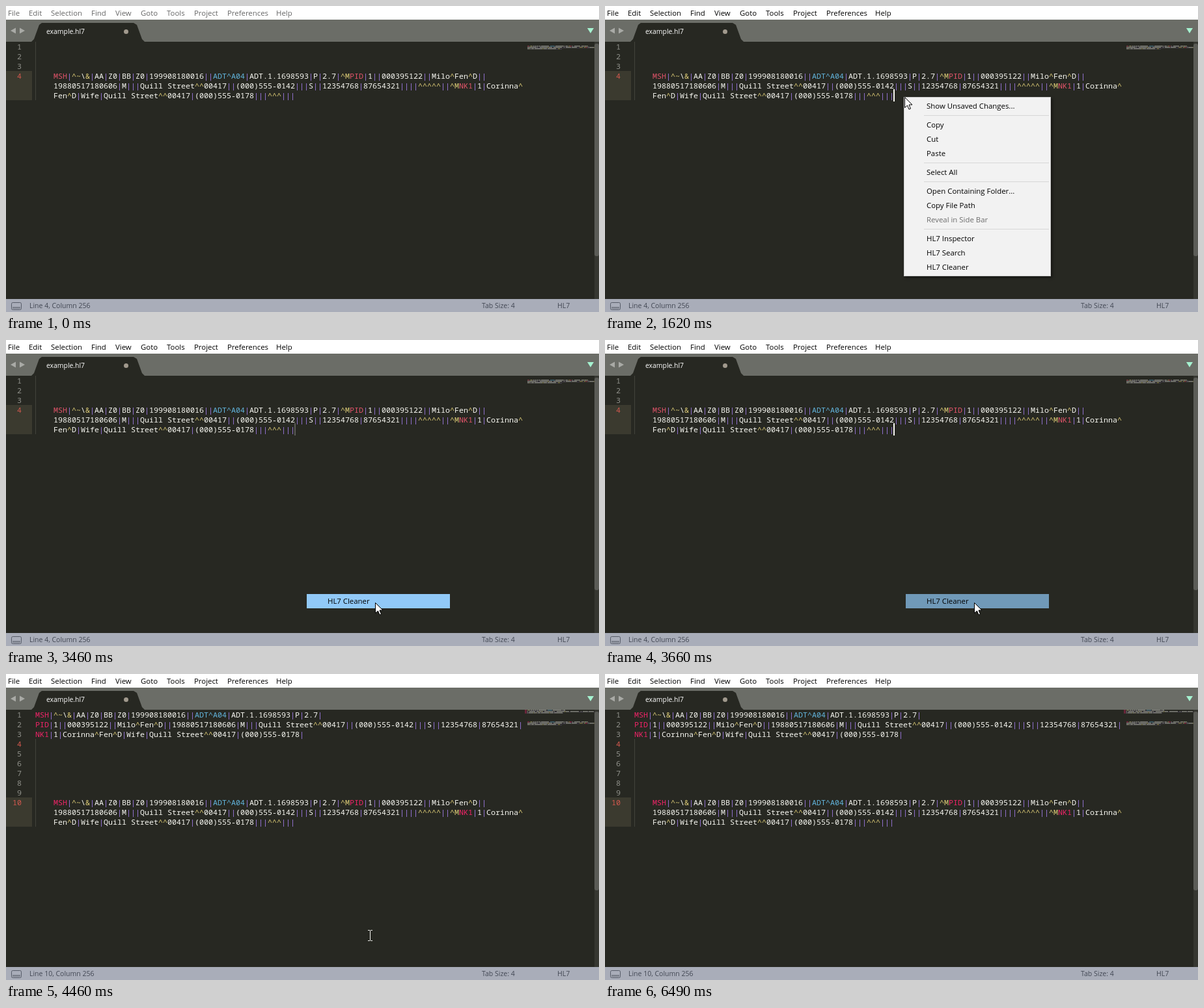
An HTML page with a canvas that plays this animation: 911 by 471 pixels, repeating every 6.69 s.

```html
<!DOCTYPE html>
<html lang="en">
<head>
<meta charset="utf-8">
<title>HL7 Cleaner</title>
<style>
html, body { margin: 0; height: 100%; overflow: hidden; background: #272822; }
canvas { display: block; }
</style>
</head>
<body>
<canvas id="stage" width="911" height="471"></canvas>
<script>
const ctx = document.getElementById('stage').getContext('2d');
const LOOP = 6690, STEPS = 33, CHAR = 7, ROW = 15;
const MONO = '11.667px "Noto Sans Mono", monospace';
const ui = size => `${size}px "Open Sans", sans-serif`;

const header = 'MSH|^~\\&|AA|Z0|BB|Z0|199908180016||ADT^A04|ADT.1.1698593|P|2.7|';
const patient = 'PID|1||000395122||Milo^Fen^D||';
const details = '19880517180606|M|||Quill Street^^00417||(000)555-0142|||S||12354768|87654321|';
const raw = [
  header + '^M' + patient,
  details + '|||^^^^^||^MNK1|1|Corinna^',
  'Fen^D|Wife|Quill Street^^00417|(000)555-0178|||^^^|||'
];
const cleaned = [header, patient + details, 'NK1|1|Corinna^Fen^D|Wife|Quill Street^^00417|(000)555-0178|'];

const menuBar = [['File', 3], ['Edit', 35], ['Selection', 69], ['Find', 131], ['View', 168], ['Goto', 207],
  ['Tools', 247], ['Project', 289], ['Preferences', 340], ['Help', 415]];
const contextMenu = [['Show Unsaved Changes...', 154], ['Copy', 183], ['Cut', 205], ['Paste', 227],
  ['Select All', 256], ['Open Containing Folder...', 285], ['Copy File Path', 307],
  ['Reveal in Side Bar', 329], ['HL7 Inspector', 358], ['HL7 Search', 380], ['HL7 Cleaner', 402]];

// Mouse stops: step, x, y
const mouseStops = [[1, 637, 409], [6, 461, 141], [8, 460, 140], [12, 562, 370], [15, 567, 403],
  [18, 567, 404], [19, 559, 402], [23, 559, 402], [24, 557, 400], [25, 557, 400], [31, 688, 474]];

function rect(color, x, y, w, h) {
  ctx.fillStyle = color;
  ctx.fillRect(x, y, w, h);
}

function text(str, x, y, color, font, align = 'left') {
  ctx.font = font;
  ctx.fillStyle = color;
  ctx.textAlign = align;
  ctx.fillText(str, x, y);
}

function polygon(color, points, stroke) {
  ctx.beginPath();
  points.forEach(([x, y]) => ctx.lineTo(x, y));
  ctx.closePath();
  ctx.fillStyle = color;
  ctx.fill();
  if (stroke) {
    ctx.strokeStyle = stroke;
    ctx.lineWidth = 1;
    ctx.stroke();
  }
}

function tokenColor(token, red) {
  if (/^(MSH|PID|NK1)$/.test(token)) return red;
  if (token === 'ADT^A04') return '#62b4dc';
  if (token === '|') return '#a07be8';
  return /^[\^~&]/.test(token) ? '#e0cf78' : '#f8f8f2';
}

function codeLine(str, x, row, red) {
  const mapX = 797 + (x - 45) / CHAR, mapY = 55 + row.map * 2;
  let i = 0;
  for (const token of str.match(/MSH|PID|NK1|ADT\^A04|\^M|[|^~&]|[^|^~&]+/g)) {
    const color = tokenColor(token, red);
    text(token, x + i * CHAR, row.y + 4, color, MONO);
    ctx.globalAlpha = 0.42;
    if (token !== '|') rect(color, mapX + i, mapY, token.length, 1);
    ctx.globalAlpha = 0.22;
    rect(color, mapX + i, mapY + 1, token.length, 1);
    ctx.globalAlpha = 1;
    i += token.length;
  }
}

const rowAt = n => ({ y: 63 + n * ROW, map: n });

function drawEditor(done, caret) {
  const last = done ? 10 : 4;
  const red = done ? '#f02468' : '#e2546a';
  const top = 55 + (last - 1) * ROW;
  rect('#272822', 0, 55, 911, 396);
  rect('#3b3a2f', 0, top, 40, 45);
  const guideTop = done ? 100 : 55;
  rect('#42433b', 45, guideTop, 1, top + 45 - guideTop);
  for (let n = 1; n <= last; n++) {
    const active = n === 4 || n === last;
    text(n, 24, 52 + n * ROW, active ? '#d2584e' : '#90918b', MONO, 'right');
  }
  if (done) cleaned.forEach((line, i) => codeLine(line, 45, rowAt(i), red));
  raw.forEach((line, i) => codeLine(line, 73, rowAt(last - 1 + i), red));
  rect(`rgba(248,248,242,${caret})`, 443, top + 28, 2, 19);
  rect('#363731', 904, 55, 7, 396);
  ctx.fillStyle = '#5b5c57';
  ctx.beginPath();
  ctx.roundRect(904, 58, 7, done ? 275 : 327, 3);
  ctx.fill();
}

function drawChrome(focused, line) {
  rect('#fff', 0, 0, 911, 21);
  menuBar.forEach(([label, x]) => text(label, x, 15, focused ? '#000' : '#666', ui(11.4)));
  rect('#6b6d67', 0, 21, 911, 34);
  polygon('#272822', [[39, 55], [43, 51], [51, 29], [55, 26], [196, 26], [201, 29], [209, 51], [213, 55]]);
  polygon('#a9aaa6', [[7, 38], [15, 33.5], [15, 42.5]]);
  polygon('#a9aaa6', [[29, 38], [21, 33.5], [21, 42.5]]);
  polygon('#a5f2d0', [[893, 34], [903, 34], [898, 42]]);
  text('example.hl7', 62, 43, '#fff', ui(10.4));
  ctx.fillStyle = '#a1998d';
  ctx.beginPath();
  ctx.arc(184.5, 39.5, 3.5, 0, 7);
  ctx.fill();

  rect('#a9adb9', 0, 451, 911, 20);
  ctx.strokeStyle = '#555a66';
  ctx.lineWidth = 1;
  ctx.beginPath();
  ctx.roundRect(8.5, 456.5, 15, 11, 2);
  ctx.stroke();
  rect('#7d828d', 10, 463, 12, 3);
  const status = (str, x) => text(str, x, 465, '#434854', ui(10.5));
  status(`Line ${line}, Column 256`, 36);
  status('Tab Size: 4', 731);
  status('HL7', 847);
}

function drawContextMenu(mouseY) {
  ctx.save();
  ctx.shadowColor = 'rgba(0,0,0,.5)';
  ctx.shadowBlur = 4;
  ctx.shadowOffsetX = ctx.shadowOffsetY = 2;
  rect('#ccc', 459, 140, 226, 276);
  ctx.restore();
  rect('#f2f2f2', 460, 141, 224, 274);
  [168, 241, 270, 343].forEach(y => rect('#d7d7d7', 490, y, 192, 1));
  for (const [label, y] of contextMenu) {
    const disabled = label.startsWith('Reveal');
    if (!disabled && mouseY > 143 && Math.abs(mouseY - y) <= 11) rect('#91c9f7', 462, y - 11, 220, 22);
    text(label, 494, y + 4, disabled ? '#6d6d6d' : '#000', ui(11.4));
  }
}

function mouseAt(step) {
  const i = mouseStops.findIndex(stop => stop[0] >= step);
  if (step < 1 || i < 0) return null;
  const [s1, x1, y1] = mouseStops[i], [s0, x0, y0] = mouseStops[Math.max(0, i - 1)];
  const k = s1 === s0 ? 1 : (step - s0) / (s1 - s0);
  return [Math.round(x0 + (x1 - x0) * k), Math.round(y0 + (y1 - y0) * k)];
}

function drawArrow(x, y) {
  const shape = [[0, 0], [0, 16], [4, 12.5], [6.5, 18.5], [9, 17.5], [6.5, 11.5], [11.5, 11.5]];
  polygon('#fff', shape.map(([dx, dy]) => [x + dx + 0.5, y + dy + 0.5]), '#000');
}

function drawBeam(x, y) {
  rect('#f4f4f0', x, y - 7, 1, 15);
  for (const edge of [y - 8, y + 8]) {
    rect('#f4f4f0', x - 3, edge, 3, 1);
    rect('#f4f4f0', x + 1, edge, 3, 1);
  }
}

function caretAlpha(step) {
  if (step < 7 || step === 32) return 0;
  if ([9, 12, 17, 20, 26].includes(step)) return 0.25;
  return [7, 8, 13, 14, 18, 19, 24, 25, 29, 30, 31].includes(step) ? 1 : 0;
}

function draw(time) {
  const step = Math.floor((time % LOOP + 4) * STEPS / LOOP) % STEPS;
  const done = step >= 19;
  const mouse = mouseAt(step);
  drawEditor(done, caretAlpha(step));
  drawChrome(step >= 7, done ? 10 : 4);
  if (step >= 8 && step < 17) drawContextMenu(mouse[1]);
  if (step === 17 || step === 18) {
    rect(step === 17 ? '#91c9f7' : '#7099b8', 462, 391, 220, 22);
    text('HL7 Cleaner', 494, 406, '#000', ui(11.4));
  }
  if (mouse) {
    const arrow = (step >= 8 && step < 19) || mouse[1] > 450;
    (arrow ? drawArrow : drawBeam)(...mouse);
  }
}

const start = performance.now();
function tick() {
  draw(performance.now() - start);
  requestAnimationFrame(tick);
}
tick();
</script>
</body>
</html>
```
